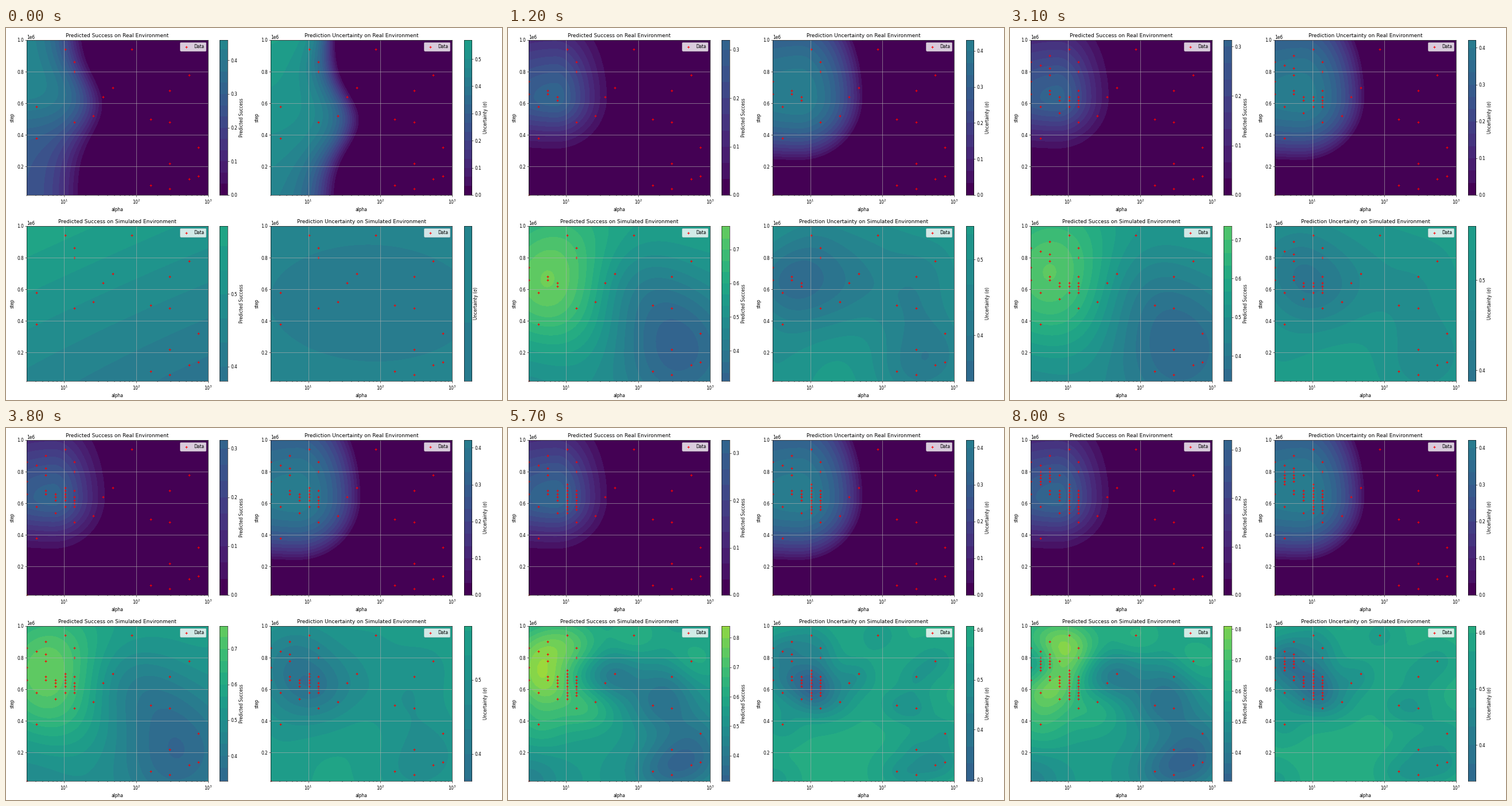
Recreate the animation shown at these times as a matplotlib script. Size 864 by 648 pixels, loop 8100 ms.

```python
import numpy as np
import matplotlib.pyplot as plt
from matplotlib.animation import FuncAnimation
from matplotlib.ticker import FormatStrFormatter, MultipleLocator, NullFormatter

WIDTH, HEIGHT, DPI = 864, 648, 54
STEPS, INTERVAL = 81, 100
PANEL_W, PANEL_H = 316, 270
BANDS = 30
KEYS = [0, 12, 31, 57, 80]

# Panel grid in pixels from the top left corner, and the same grid in data units.
gx, gy = np.meshgrid(np.linspace(0, PANEL_W, 80), np.linspace(0, PANEL_H, 68))
alpha_grid = 3 * (1000 / 3) ** (gx / PANEL_W)
step_grid = 1e6 * (1 - 0.98 * gy / PANEL_H)

viridis = plt.get_cmap("viridis")
band_colors = viridis((np.arange(BANDS) + 0.5) / BANDS)
band_colors[0] = viridis(0.0)


def at(step, values):
    return np.interp(step, KEYS, values)


# --- Samples on a 20 x 50 grid: (alpha index, step / 20000) ---
samples = [(4, 47), (11, 47), (5, 43), (5, 40), (17, 39), (9, 35), (15, 34), (8, 32),
           (1, 29), (7, 26), (13, 25), (5, 24), (15, 24), (1, 19), (18, 16), (15, 11),
           (18, 7), (17, 6), (13, 4), (15, 3)]
births = [0] * len(samples)

# Runs along one column, one new sample per step: (start, column, rows).
runs = [(3, 2, range(33, 35)), (6, 3, range(31, 33)), (9, 0, [1]), (10, 0, range(33, 38, 4)),
        (13, 5, range(30, 33)), (16, 4, [29]), (17, 2, range(39, 42, 2)), (19, 1, [42]),
        (20, 3, [27]), (23, 4, range(31, 33)), (25, 5, range(29, 35, 5)), (28, 0, [43]),
        (29, 2, [45]), (33, 3, [33]), (35, 4, range(33, 36)), (40, 4, range(28, 31, 2)),
        (44, 5, [33]), (50, 3, [34]), (52, 4, range(27, 37, 9)), (55, 5, [28]),
        (59, 5, [27]), (62, 1, range(36, 41)), (69, 2, range(37, 39)), (73, 2, [40]),
        (76, 3, [39])]
for start, column, rows in runs:
    for i, row in enumerate(rows):
        samples.append((column, row))
        births.append(start + i)

births = np.array(births)
col, row = np.array(samples).T
points = np.column_stack([3 * (1000 / 3) ** (col / 19), 2e4 * row])
sx, sy = PANEL_W * col / 19, PANEL_H * (50 - row) / 49

# Low alpha and late steps succeed, apart from some mixed clusters.
success = ((col <= 7) & (row >= 19)) | (row >= 38)
success &= ~((col == 1) & (row >= 36) & (row <= 40))
success &= ~((col >= 4) & (row >= 27) & (row <= 36) & (row % 3 == 0))
outcome = np.where(success, 0.5, -0.5)


# --- Simulated environment: Gaussian process over the samples ---
def kernel(x1, y1, x2, y2, lx, ly):
    dx = (x1[:, None] - x2) / lx
    dy = (y1[:, None] - y2) / ly
    return np.exp(-0.5 * (dx ** 2 + dy ** 2))


def rescale(field, low, high):
    return low + (high - low) * (field - field.min()) / np.ptp(field)


def simulated(step):
    seen = births <= step
    x, y = sx[seen], sy[seen]
    lx = np.exp(at(step, np.log([900, 72, 78, 36, 36])))
    ly = np.exp(at(step, np.log([500, 72, 78, 32, 32])))
    noise = at(step, [6, 6, 6, 3.1, 3.1])
    cov = kernel(x, y, x, y, lx, ly) + noise * np.eye(len(x))
    cross = kernel(x, y, gx.ravel(), gy.ravel(), lx, ly)
    weights = np.linalg.solve(cov, cross)
    mean = (outcome[seen] @ weights).reshape(gx.shape)
    sigma = np.sqrt(1 - (cross * weights).sum(axis=0)).reshape(gx.shape)
    mean = rescale(mean, at(step, [0.38, 0.31, 0.335, 0.314, 0.309]),
                   at(step, [0.594, 0.77, 0.736, 0.84, 0.81]))
    sigma = rescale(sigma, at(step, [0.42, 0.34, 0.388, 0.297, 0.336]),
                    at(step, [0.455, 0.544, 0.56, 0.608, 0.612]))
    return mean, sigma


# --- Real environment: a front along alpha that closes into a hill ---
def front(edge, bulge, center, spread, scale, power):
    depth = edge + bulge * np.exp(-((gy - center) / spread) ** 2) - gx
    return 1 - np.exp(-(np.maximum(depth, 0) / scale) ** power)


front_success = front(100, 40, 115, 70, 48, 1.5)
front_success *= 0.27 + 0.19 / (1 + np.exp((gy - 135) / 22))
front_sigma = front(114, 44, 140, 65, 30 + 14 * np.tanh(gy / 100), 1.3)
front_sigma *= 0.57 * (1 - 0.2 * gy / PANEL_H)

dx, dy = gx - 47, gy - 100
radius = np.hypot(np.where(dx < 0, 0.4, 1) * dx, np.where(dy < 0, 0.6, 1) * dy)
hill_sigma = 0.43 * np.maximum(1 - (radius / 113) ** 2, 0)
hill_success = (1 - np.sqrt(1 - 4 * (hill_sigma / 0.92) ** 2)) / 2


def real(step):
    t = min(step / KEYS[1], 1)
    mean = (1 - t) * front_success + t * hill_success
    sigma = (1 - t) * front_sigma + t * hill_sigma
    mean *= at(step, [0.46, 0.32, 0.313, 0.328, 0.32]) / mean.max()
    sigma *= at(step, [0.57, 0.43, 0.421, 0.421, 0.421]) / sigma.max()
    return mean, sigma


# --- Figure ---
fig = plt.figure(figsize=(WIDTH / DPI, HEIGHT / DPI), dpi=DPI)


def pixel_axes(x, y, w, h):
    return fig.add_axes([x / WIDTH, 1 - (y + h) / HEIGHT, w / WIDTH, h / HEIGHT])


def make_panel(title, label, x, y):
    ax = pixel_axes(x, y, PANEL_W, PANEL_H)
    ax.set_xscale("log")
    ax.set(xlim=(3, 1000), ylim=(2e4, 1e6), title=title, xlabel="alpha", ylabel="step")
    ax.xaxis.set_minor_formatter(NullFormatter())
    ax.grid(True)
    dots = ax.scatter(*points.T, c="red", marker="+", label="Data")
    ax.legend(loc="upper right")

    bar = pixel_axes(x + 336.4, y, 13.5, PANEL_H)
    bar.imshow(band_colors[:, None, :], extent=(0, 1, 0, 1), origin="lower",
               aspect="auto", interpolation="nearest")
    bar.set_xticks([])
    bar.yaxis.tick_right()
    bar.yaxis.set_label_position("right")
    bar.yaxis.set_major_locator(MultipleLocator(0.1))
    bar.yaxis.set_major_formatter(FormatStrFormatter("%.1f"))
    bar.set_ylabel(label)
    return ax, bar, dots


views = []
for place, top in (("Real", 20.9), ("Simulated", 344.9)):
    views.append(make_panel(f"Predicted Success on {place} Environment",
                            "Predicted Success", 36, top))
    views.append(make_panel(f"Prediction Uncertainty on {place} Environment",
                            "Uncertainty (σ)", 461.2, top))
fills = [None] * len(views)


def update(step):
    visible = points[births <= step]
    for n, (field, (ax, bar, dots)) in enumerate(zip(real(step) + simulated(step), views)):
        low, high = field.min(), field.max()
        first, last = int(low * BANDS), int(high * BANDS) + 1
        if fills[n] is not None:
            fills[n].remove()
        fills[n] = ax.contourf(alpha_grid, step_grid, field,
                               levels=np.arange(first, last + 1) / BANDS,
                               colors=band_colors[first:last], zorder=0)
        bar.set_ylim(low, high)
        dots.set_offsets(visible)
    return []


anim = FuncAnimation(fig, update, frames=STEPS, interval=INTERVAL,
                     init_func=lambda: [], repeat=True, repeat_delay=0)
plt.show()
```
